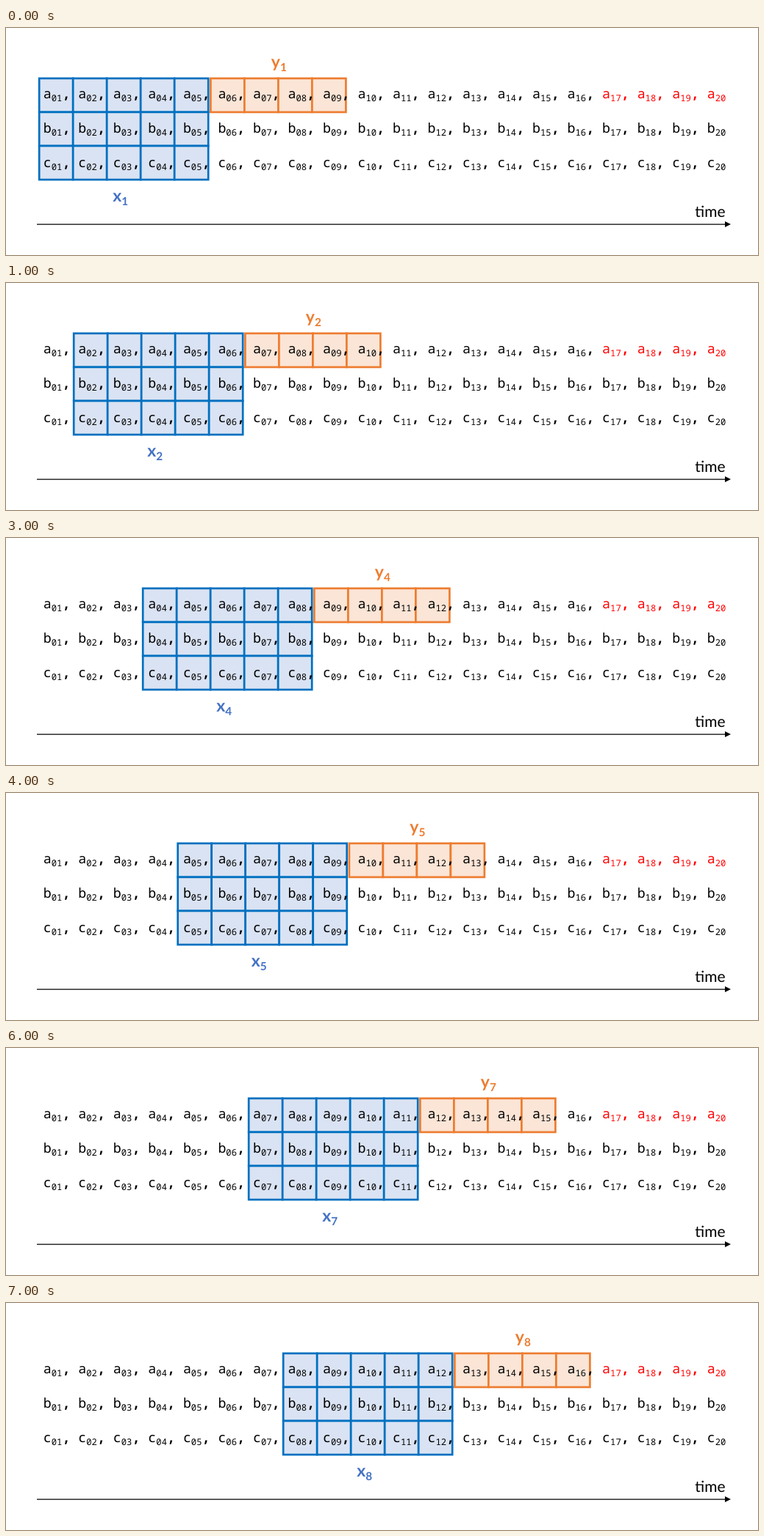
Write an HTML page that moves like this. It is 1023 px wide and 310 px high and loops after 8000 ms.

```html
<!DOCTYPE html>
<html lang="en">
<head>
<meta charset="utf-8">
<title>Sliding window over time series</title>
<style>
  html, body { margin: 0; height: 100%; overflow: hidden; background: #fff; }
  svg { display: block; width: 100%; height: 100%; }
  text { text-rendering: geometricPrecision; white-space: pre; }
  .cell { font: 18.3px "Noto Sans Mono", monospace; }
  .cell .sub { font-size: 12.2px; }
  .cell .comma { font-weight: bold; }
  .label { font: bold 23px Lato, sans-serif; }
  .label .sub { font-size: 15.4px; }
  .time { font: 21px Lato, sans-serif; text-anchor: end; }
  rect { stroke-width: 2.7; }
  .input { fill: #dae3f3; stroke: #0070c0; }
  .output { fill: #fbe5d6; stroke: #ed7d31; }
</style>
</head>
<body>
<svg viewBox="0 0 1023 310">
  <g id="window"></g>
  <g id="series"></g>
  <text class="time" x="978.5" y="257.8">time</text>
  <path d="M42 268.1H980" stroke="#000" stroke-width="1.4"/>
  <path d="M978 264.1L986 268.1L978 272.1Z"/>
</svg>
<script>
const STEP_MS = 1000;
const OFFSETS = [0, 47, 94, 141, 188.5, 237, 285, 332];
const CELL = 46, ROW = 46.1, TOP = 68.8;
const windowGroup = document.getElementById("window");
const series = document.getElementById("series");

function add(parent, tag, attrs, text = "") {
  const el = document.createElementNS("http://www.w3.org/2000/svg", tag);
  for (const key in attrs) el.setAttribute(key, attrs[key]);
  el.textContent = text;
  parent.append(el);
  return el;
}

function addTerm(parent, cls, letter, sub, tail, x, y, drop, fill) {
  const term = add(parent, "text", { class: cls, x, y, fill }, letter);
  const index = add(term, "tspan", { class: "sub", dy: drop }, sub);
  if (tail) add(term, "tspan", { class: "comma", dy: -drop }, tail);
  return index;
}

function addBoxes(cls, left, cols, rows) {
  for (let r = 0; r < rows; r++)
    for (let c = 0; c < cols; c++)
      add(windowGroup, "rect", {
        class: cls, x: left + c * CELL, y: TOP + r * ROW, width: CELL, height: ROW
      });
}

["a", "b", "c"].forEach((letter, row) => {
  for (let i = 1; i <= 20; i++) {
    const fill = letter === "a" && i > 16 ? "#f00" : "#000";
    addTerm(series, "cell", letter, String(i).padStart(2, "0"), i < 20 ? "," : "",
      50.8 + (i - 1) * 47.52, 96 + row * 47, 3.8, fill);
  }
});

addBoxes("input", 45.2, 5, 3);
addBoxes("output", 278.4, 4, 1);
const indices = [
  addTerm(windowGroup, "label", "x", "1", "", 145.2, 236.5, 5.2, "#4472c4"),
  addTerm(windowGroup, "label", "y", "1", "", 360.8, 54, 5.2, "#ed7d31")
];

function draw(now) {
  const step = Math.floor(now / STEP_MS) % OFFSETS.length;
  windowGroup.setAttribute("transform", `translate(${OFFSETS[step]})`);
  for (const index of indices) index.textContent = step + 1;
  requestAnimationFrame(draw);
}
draw(performance.now());
</script>
</body>
</html>
```
